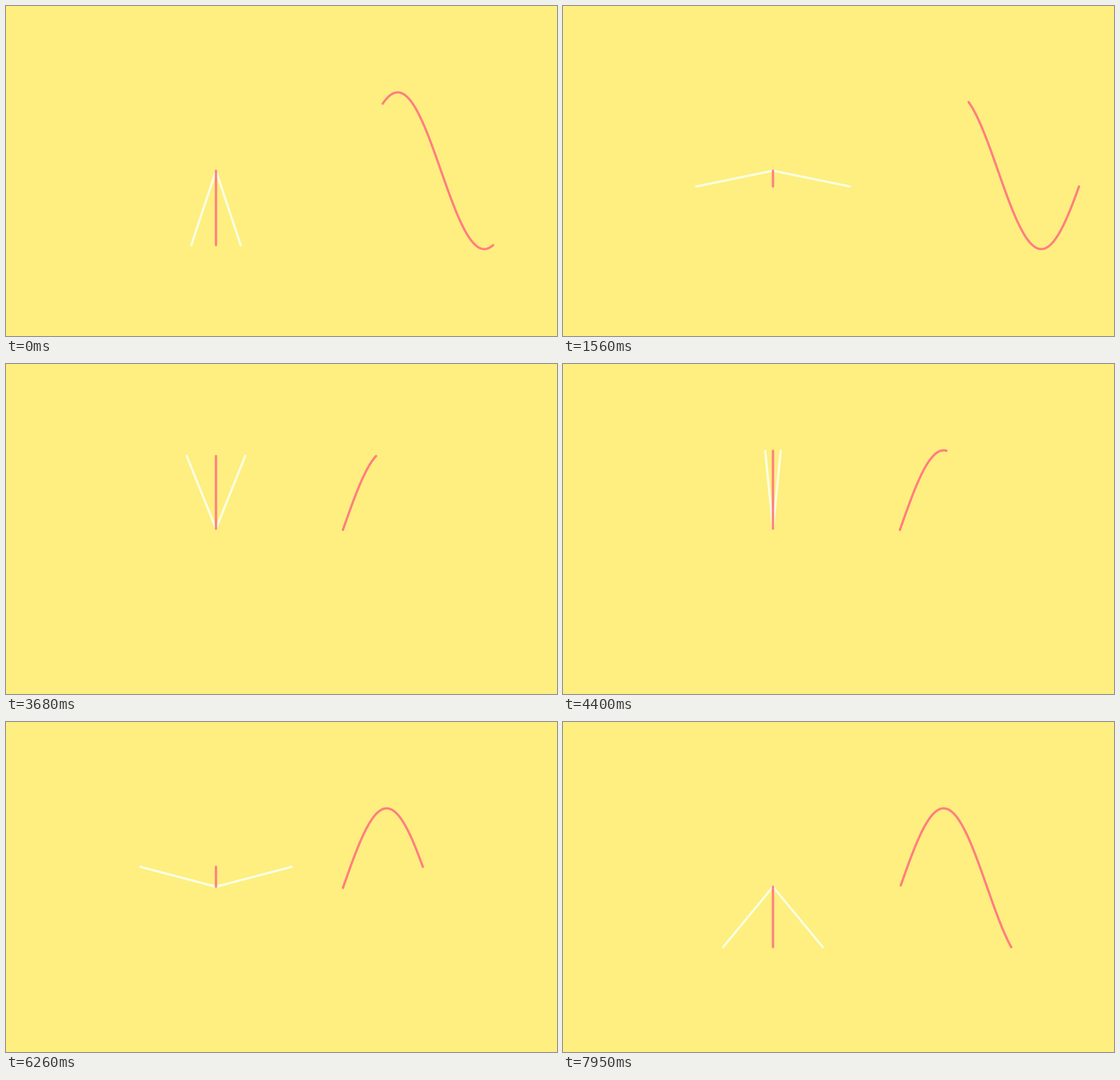
Write an HTML page that moves like this. It is 967 by 579 pixels and loops after 7990 ms.

```html
<!DOCTYPE html>
<html lang="en">
<head>
<meta charset="utf-8">
<title>Sine wave</title>
<style>
  html, body { margin: 0; width: 100%; height: 100%; overflow: hidden; background: #ffee80; }
  svg { display: block; width: 100vw; height: 100vh; }
  path { fill: none; stroke: #ff7f7f; stroke-width: 4; stroke-linecap: round; stroke-linejoin: round; }
  #arms { stroke: #f8ffe0; }
</style>
</head>
<body>
<svg viewBox="0 0 967 579">
  <path id="arms"/>
  <path id="height"/>
  <path id="wave"/>
</svg>
<script>
const LOOP = 7990;
const CX = 368.5, CY = 289, R = 137.5;
const TURN = 2 * Math.PI;
const WAVE_X = 592;          // where the wave crosses zero after a restart
const SCALE = 152 / Math.PI; // pixels per radian
const TRAIL = 193.8;         // longest visible stretch of the wave
const LEAD = 0.0145;         // the wave restarts just before a full turn
const FIRST_SHIFT = 19.4;    // offset of the wave before the restart

// time in ms, angle in radians
const KEYS = [
  [0, 5.032], [1560, 6.08], [2560, 6.743], [3680, 7.471],
  [5080, 8.408], [6260, 9.167], [7950, 10.305]
];

const arms = document.getElementById('arms');
const height = document.getElementById('height');
const wave = document.getElementById('wave');

function angleAt(t) {
  let i = 1;
  while (i < KEYS.length - 1 && t > KEYS[i][0]) i++;
  const [t0, a0] = KEYS[i - 1], [t1, a1] = KEYS[i];
  return a0 + (a1 - a0) * (t - t0) / (t1 - t0);
}

const point = (x, y) => x.toFixed(2) + ' ' + y.toFixed(2);

function wavePath(from, to, zero) {
  const steps = Math.max(1, Math.ceil((to - from) / 1.5));
  const pts = [];
  for (let i = 0; i <= steps; i++) {
    const x = from + (to - from) * i / steps;
    pts.push(point(x, CY - R * Math.sin((x - zero) / SCALE)));
  }
  return 'M' + pts.join('L');
}

function draw(t) {
  let a = angleAt(t);
  const restarted = a >= TURN - LEAD;
  if (restarted) a -= TURN;

  const dx = R * Math.cos(a), y = CY - R * Math.sin(a);
  arms.setAttribute('d', `M${point(CX - dx, y)}L${point(CX, CY)}L${point(CX + dx, y)}`);
  height.setAttribute('d', `M${point(CX, CY)}L${point(CX, y)}`);

  const zero = WAVE_X + (restarted ? 0 : FIRST_SHIFT);
  const head = zero + a * SCALE;
  const tail = Math.max(WAVE_X - LEAD * SCALE, head - TRAIL);
  wave.setAttribute('d', wavePath(tail, head, zero));
}

const start = performance.now();
function tick() {
  draw((performance.now() - start) % LOOP);
  requestAnimationFrame(tick);
}
draw(0);
requestAnimationFrame(tick);
</script>
</body>
</html>
```
